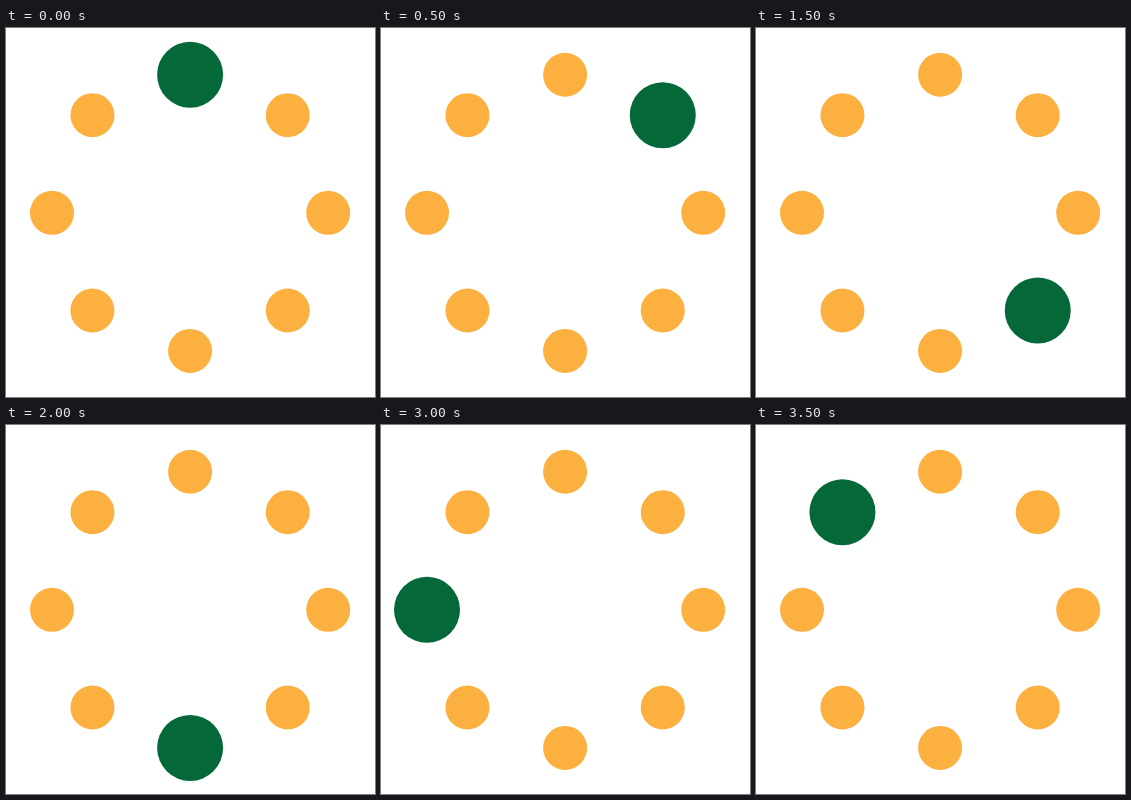
An HTML page that plays this animation: 369 by 369 pixels, repeating every 4 s.

```html
<!DOCTYPE html>
<html lang="en">
<head>
<meta charset="utf-8">
<title>Dot ring</title>
<style>
html, body { margin: 0; width: 100%; height: 100%; overflow: hidden; background: #fff; }
svg { display: block; width: 100%; height: 100%; }
</style>
</head>
<body>
<svg id="stage" viewBox="0 0 369 369"></svg>
<script>
const COUNT = 8, STEP = 500;
const CX = 184.1, CY = 184.85, RING = 138.1;
const stage = document.getElementById('stage');

const dots = Array.from({ length: COUNT }, (_, i) => {
  const dot = document.createElementNS('http://www.w3.org/2000/svg', 'circle');
  const angle = i / COUNT * 2 * Math.PI;
  dot.setAttribute('cx', CX + RING * Math.sin(angle));
  dot.setAttribute('cy', CY - RING * Math.cos(angle));
  return stage.appendChild(dot);
});

// The highlight jumps clockwise, one dot per step.
function draw(ms) {
  const active = Math.floor(ms / STEP) % COUNT;
  dots.forEach((dot, i) => {
    dot.setAttribute('r', i === active ? 33 : 22);
    dot.setAttribute('fill', i === active ? '#056839' : '#fcb040');
  });
}

let start = null;
function tick(now) {
  if (start === null) start = now;
  draw(Math.max(0, now - start));
  requestAnimationFrame(tick);
}
draw(0);
requestAnimationFrame(tick);
</script>
</body>
</html>
```
